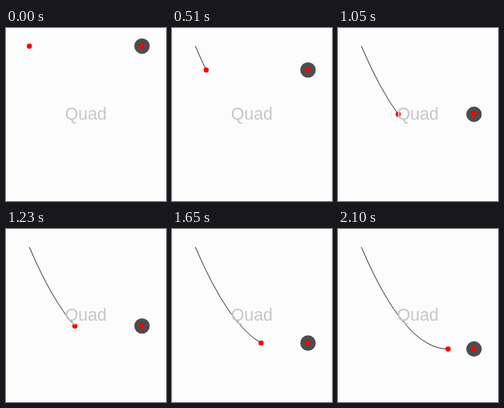
Animation, 200 px wide and 217 px high, one loop 2400 ms. Source, as an HTML page:

```html
<!DOCTYPE html>
<html lang="en">
<meta charset="utf-8">
<title>Quad easing</title>
<style>
  html, body { margin: 0; width: 100%; height: 100%; overflow: hidden; background: #fcfcfc; }
  svg { display: block; }
  text { font: 21.3px "Liberation Sans", Arial, sans-serif; fill: #c6c6c6; }
</style>
<svg width="200" height="217" viewBox="0 0 200 217">
  <path id="trail" fill="none" stroke="#222" stroke-width=".9"/>
  <circle id="dot" r="3.2" fill="#f00"/>
  <g id="ball">
    <circle r="9.7" fill="#4d4d4d"/>
    <circle r="3.2" fill="#f00"/>
  </g>
  <text x="99.8" y="115.3" text-anchor="middle">Quad</text>
</svg>
<script>
  const LOOP = 2400, STEP = 30, START = 285, TRAVEL = 1800;
  const [trail, dot, ball] = ['trail', 'dot', 'ball'].map(id => document.getElementById(id));
  const px = u => 29.2 + 108.4 * u;
  const py = v => 22.7 + 127.8 * v;
  const easeOut = p => p * (2 - p);

  function draw(now) {
    const t = Math.floor(now % LOOP / STEP) * STEP;
    const p = Math.min(1, Math.max(0, (t - START) / TRAVEL));
    const x = px(p), y = py(easeOut(p));
    // The eased curve is a parabola, so one quadratic segment traces it exactly
    trail.setAttribute('d', `M${px(0)} ${py(0)}Q${px(p / 2)} ${py(p)} ${x} ${y}`);
    dot.setAttribute('transform', `translate(${x} ${y})`);
    ball.setAttribute('transform', `translate(170 ${y})`);
  }

  const begin = performance.now();
  function frame() {
    draw(performance.now() - begin);
    requestAnimationFrame(frame);
  }
  frame();
</script>
</html>
```
